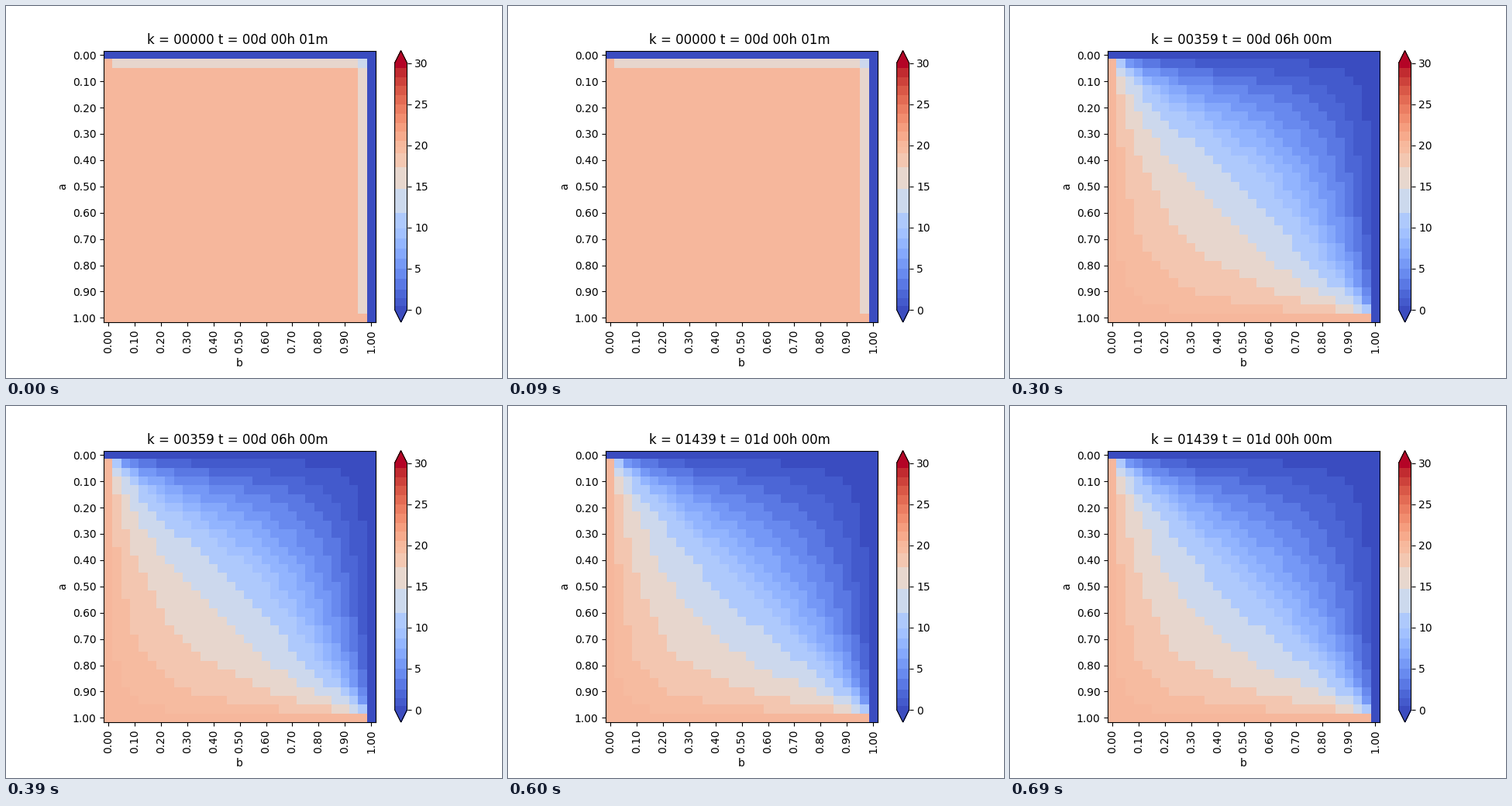
Write a matplotlib script that moves like this. It is 640 by 480 pixels and loops after 0.75 s.

```python
import matplotlib.pyplot as plt
import numpy as np
from matplotlib.animation import FuncAnimation
from matplotlib.colors import ListedColormap

N = 30            # grid intervals per side
HOT = 20.0        # left and bottom walls; top and right walls stay at 0
T_MAX = 30.0
FIRST_RATE = 0.2  # explicit first step
RATE = 0.285      # diffusion number per minute afterwards
MINUTES = [1] + [60 * hours for hours in (2, 6, 12, 24)]

# Sine modes of the interior grid
p = np.arange(1, N)
modes = np.sqrt(2 / N) * np.sin(np.pi * np.outer(p, p) / N)
lam = 4 * np.sin(np.pi * p / (2 * N)) ** 2
lam2 = lam[:, None] + lam[None, :]

source = np.zeros((N - 1, N - 1))
source[:, 0] += HOT
source[-1, :] += HOT
steady = modes @ source @ modes / lam2
start = modes @ np.full((N - 1, N - 1), HOT) @ modes


def field(minute):
    """Temperature on the whole grid, walls included."""
    decay = (1 - FIRST_RATE * lam2) * np.exp(-RATE * lam2 * (minute - 1))
    t = np.zeros((N + 1, N + 1))
    t[1:, 0] = HOT
    t[-1, :-1] = HOT
    t[1:-1, 1:-1] = modes @ (steady + (start - steady) * decay) @ modes
    return t


def banded_cmap(samples=600):
    """Coolwarm reduced to a few tones: even steps at both ends, wider in the middle."""
    tones = np.r_[0, 1, 1.86:9.3:7j, 10.4, 13.2, 16.2, 18.4, 19.6, 20:T_MAX:10j]
    t = np.linspace(0, T_MAX, samples)
    nearest = np.abs(t[:, None] - tones).argmin(axis=1)
    return ListedColormap(plt.get_cmap("coolwarm")(tones[nearest] / T_MAX))


def title(minute):
    days, rest = divmod(minute, 1440)
    hours, minutes = divmod(rest, 60)
    return f"k = {minute - 1:05d} t = {days:02d}d {hours:02d}h {minutes:02d}m"


fig, ax = plt.subplots(figsize=(6.4, 4.8), dpi=100)
fig.subplots_adjust(bottom=0.15)
image = ax.imshow(field(1), cmap=banded_cmap(), vmin=0, vmax=T_MAX,
                  interpolation="nearest")
fig.colorbar(image, ax=ax, extend="both", aspect=22, ticks=range(0, 31, 5))

ticks = range(0, N + 1, 3)
labels = [f"{v / N:.2f}" for v in ticks]
ax.set_xticks(ticks, labels, rotation=90)
ax.set_yticks(ticks, labels)
ax.set_xlabel("b")
ax.set_ylabel("a")
heading = ax.set_title(title(1), x=0.4924)  # half a space left of centre


def update(i):
    image.set_data(field(MINUTES[i]))
    heading.set_text(title(MINUTES[i]))
    return image, heading


anim = FuncAnimation(fig, update, frames=len(MINUTES), interval=150,
                     repeat=True, repeat_delay=0, blit=False)
plt.show()
```
